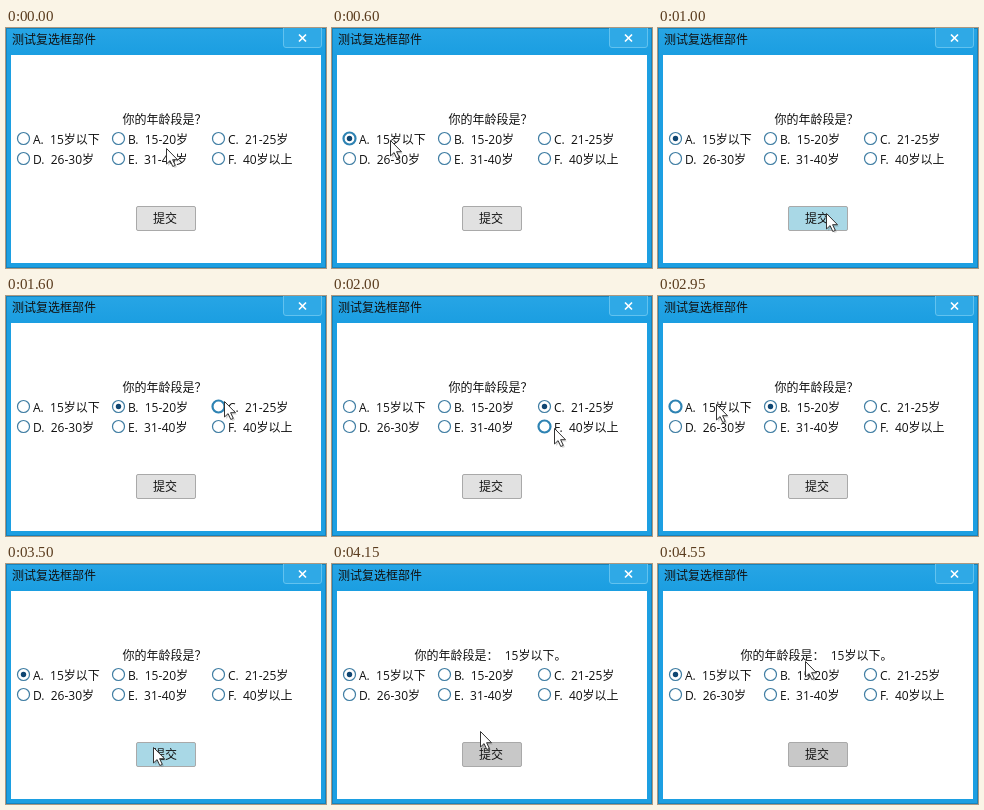
Animation of 320x240 px, one loop 4600 ms. Source, as an HTML page:

```html
<!DOCTYPE html>
<html lang="zh-CN">
<head>
<meta charset="utf-8">
<title>测试复选框部件</title>
<style>
  html, body { margin: 0; width: 100%; height: 100%; overflow: hidden; background: #1c9fe2; }
  svg { display: block; width: 320px; height: 240px; }
  text { font: 12px "Open Sans", "Noto Sans CJK SC", sans-serif; fill: #111; white-space: pre; }
  .ring { fill: #fff; stroke: #3f7da3; stroke-width: 1.2; }
  .hover .ring { stroke: #2e83b3; stroke-width: 2.2; }
  .dot { fill: #0f4672; visibility: hidden; }
  .selected .dot { visibility: visible; }
  .middle { text-anchor: middle; }
</style>
</head>
<body>
<svg viewBox="0 0 320 240">
  <defs>
    <linearGradient id="bar" x2="0" y2="1">
      <stop offset="0" stop-color="#27a5e5"/>
      <stop offset="1" stop-color="#1b9ee1"/>
    </linearGradient>
  </defs>
  <rect width="320" height="240" fill="#1c9fe2"/>
  <rect width="320" height="27" fill="url(#bar)"/>
  <rect x=".5" y=".5" width="319" height="239" fill="none" stroke="#1583bd"/>
  <path d="M277.5 0V17Q277.5 19.5 280 19.5H313Q315.5 19.5 315.5 17V0" fill="#2fa9e6" stroke="#62c2ef"/>
  <path d="M293 6.5l7 7m0-7l-7 7" stroke="#fff" stroke-width="1.7"/>
  <text x="6" y="16">测试复选框部件</text>
  <rect x="5" y="27" width="310" height="208" fill="#fff"/>
  <text id="label" class="middle" x="158.5" y="95.5"></text>
  <g id="options"></g>
  <rect id="button" x="130.5" y="178.5" width="59" height="24" rx="1.5" stroke="#a9a9a9"/>
  <text class="middle" x="159" y="195">提交</text>
  <g id="cursor">
    <path d="M2 2V18L5.7 14.5L8.5 20L11 19L8.3 13.5H13Z" fill="#000" opacity=".15"/>
    <path d="M.5 .5V16L4.1 12.6L6.8 18.5L9.3 17.4L6.6 11.7H11.5Z" fill="#fff" stroke="#333"/>
  </g>
</svg>
<script>
const LOOP = 4600, TICK = 50;
const QUESTION = '你的年龄段是？';
const ANSWER = '你的年龄段是：\u00a0\u00a015岁以下。';
const RANGES = ['15岁以下', '15-20岁', '21-25岁', '26-30岁', '31-40岁', '40岁以上'];
const COLUMNS = [17.5, 112.5, 212.5];
const byId = id => document.getElementById(id);

// Pointer keys: time, x, y
const MOVES = [
  [200, 160, 120], [350, 112, 127], [500, 58, 112],
  [600, 58, 112], [750, 112, 120], [900, 165, 180], [1000, 168, 185],
  [1050, 168, 185], [1200, 150, 125], [1300, 144, 111],
  [1350, 144, 111], [1500, 178, 108], [1600, 218, 105], [1700, 223, 107],
  [1850, 223, 107], [2000, 222, 132],
  [2150, 222, 132], [2450, 145, 126], [2650, 148, 124], [2700, 149, 108],
  [2800, 149, 108], [2950, 58, 108],
  [3100, 58, 108], [3300, 122, 161], [3400, 145, 181], [3500, 147, 183],
  [4100, 147, 183], [4200, 148, 150], [4300, 175, 98], [4400, 222, 76],
  [4450, 200, 69], [4550, 147, 97]
];
// Selected option over time
const PICKS = [[0, -1], [600, 0], [1350, 1], [1850, 2], [2150, 5], [2450, 4], [2700, 1], [3100, 0]];
const PRESS = 3600, REPLY = 3650;

byId('options').innerHTML = RANGES.map((range, i) => {
  const x = COLUMNS[i % 3], y = i < 3 ? 110.5 : 130.5;
  return `<g><circle class="ring" cx="${x}" cy="${y}" r="6"/>
    <circle class="dot" cx="${x}" cy="${y}" r="2.7"/>
    <text x="${x + 9.5}" y="${y + 5}">${'ABCDEF'[i]}.\u00a0\u00a0${range}</text></g>`;
}).join('');
const options = [...byId('options').children];

function pointerAt(time) {
  const next = MOVES.findIndex(key => key[0] > time);
  if (next < 1) return MOVES.at(next).slice(1);
  const [t0, ...from] = MOVES[next - 1], [t1, ...to] = MOVES[next];
  const part = (time - t0) / (t1 - t0);
  return from.map((value, i) => Math.round(value + (to[i] - value) * part));
}

function hoveredOption(x, y) {
  const row = y >= 103 && y < 119 ? 0 : y >= 122 && y < 139 ? 1 : -1;
  const column = COLUMNS.findIndex(center => x >= center - 8 && x < center + 76);
  return row < 0 || column < 0 ? -1 : row * 3 + column;
}

function draw(time) {
  const [x, y] = pointerAt(time);
  const picked = PICKS.findLast(pick => pick[0] <= time)[1];
  const hovered = hoveredOption(x, y);
  options.forEach((option, i) => {
    option.classList.toggle('selected', i === picked);
    option.classList.toggle('hover', i === hovered);
  });
  const overButton = x >= 130 && x < 190 && y >= 178 && y < 203;
  byId('button').setAttribute('fill', time >= PRESS ? '#c8c8c8' : overButton ? '#a9d8e6' : '#e1e1e1');
  byId('label').textContent = time >= REPLY ? ANSWER : QUESTION;
  byId('cursor').setAttribute('transform', `translate(${x} ${y})`);
}

const start = performance.now();
function tick() {
  const elapsed = (performance.now() - start) % LOOP;
  draw(Math.floor(elapsed / TICK) * TICK);
  requestAnimationFrame(tick);
}
tick();
</script>
</body>
</html>
```
